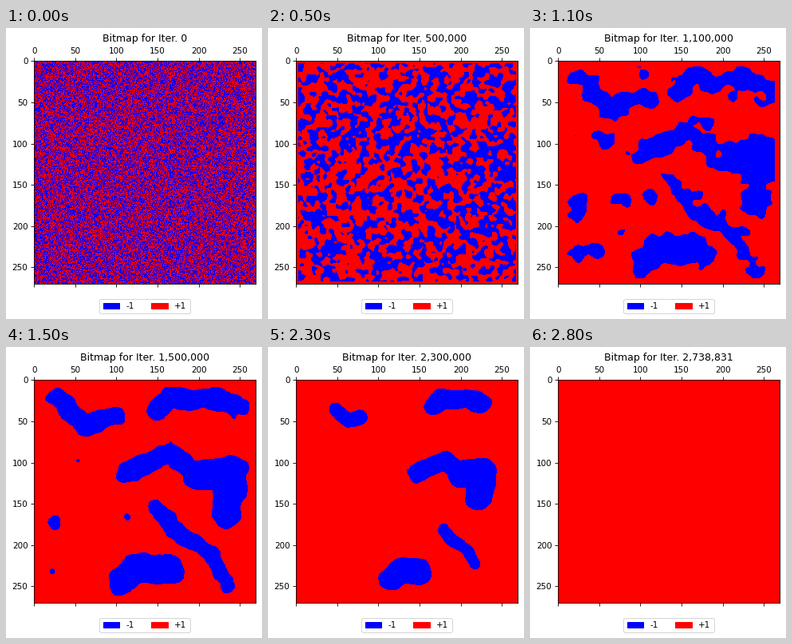
These frames come from a looping animation (321 px wide and 364 px high, 2900 ms). A matplotlib script:

```python
import numpy as np
import matplotlib.pyplot as plt
from matplotlib.animation import FuncAnimation
from matplotlib.colors import ListedColormap
from matplotlib.patches import Patch

W, H, DPI = 321, 364, 75
LEFT, TOP, SIDE = 34.7, 40.95, 278.6
N = 270
FRAMES, STEP, LAST = 29, 100_000, 2_738_831
FORMED, SETTLED = 11, 15
FLOOR, CEIL = -12, 9

# Large domains: frame of death, radius, point they shrink to, spine (stage pixels).
BODIES = [
    (24.5, 13, (101, 89), [(63, 63), (98, 98), (136, 86)]),
    (27.0, 14, (235, 66), [(188, 78), (205, 64), (260, 65), (290, 74)]),
    (27.8, 13, (245, 156), [(150, 159), (205, 132), (240, 160)]),
    (27.8, 19, (245, 156), [(240, 160), (283, 156), (276, 207)]),
    (24.8, 10, (245, 250), [(187, 200), (215, 232), (255, 256), (278, 298)]),
    (27.0, 18, (170, 284), [(145, 293), (165, 275), (205, 279)]),
]
# Small round domains: centre and frame of death.
SPECKS = [(60, 220, 18), (89, 142, 15.4), (152, 213, 15.4), (57, 280, 15.4),
          (111, 217, 14.2), (88, 284, 14), (140, 60, 14.3), (222, 120, 14.5)]

cells = (np.arange(N) + 0.5) * SIDE / N
X, Y = np.meshgrid(LEFT + cells, TOP + cells)
border = np.minimum(cells, SIDE - cells)
border = np.minimum(border[:, None], border[None, :])

rng = np.random.default_rng(7)
spins = rng.choice([-1.0, 1.0], (N, N))
spectrum = np.fft.fft2(spins)
freq = np.fft.fftfreq(N)
freq2 = freq[:, None] ** 2 + freq[None, :] ** 2


def blurred(sigma):
    out = np.fft.ifft2(spectrum * np.exp(-2 * np.pi**2 * sigma**2 * freq2)).real
    return (out - out.mean()) / out.std()


def distance(a, b):
    d = b - a
    u = ((X - a[0]) * d[0] + (Y - a[1]) * d[1]) / (d @ d + 1e-9)
    u = np.clip(u, 0, 1)
    return np.hypot(X - a[0] - u * d[0], Y - a[1] - u * d[1])


def domains(k):
    """Depth inside the domains, which shorten first and thin out last."""
    depth = np.full((N, N), float(FLOOR))
    for death, r, focus, spine in BODIES:
        age = (k - SETTLED) / (death - SETTLED)
        if age < 1:
            pts = focus + (np.array(spine) - focus) * np.sqrt(1 - age)
            r *= np.sqrt(1 - age**4)
            for a, b in zip(pts[:-1], pts[1:]):
                depth = np.maximum(depth, r - distance(a, b))
    for x, y, death in SPECKS:
        if k < death:
            r = 4.5 * np.sqrt(death - k)
            depth = np.maximum(depth, r - np.hypot(X - x, Y - y))
    return np.minimum(depth, CEIL)


def bitmap(k):
    """Random spins that coarsen, settle into domains and vanish."""
    if k == 0:
        return spins
    noise = blurred(min(0.43 * k, 4.5))
    amp = 0.8 + 16 * np.exp((7 - k) / 2.5)
    field = domains(max(k, FORMED)) + amp * noise
    field = np.minimum(field, border - 0.7 * min(k, 13))
    return np.where(field > 0, -1, 1)


fig = plt.figure(figsize=((W + 0.001) / DPI, (H + 0.001) / DPI), dpi=DPI)
ax = fig.add_axes([LEFT / W, 1 - (TOP + SIDE) / H, SIDE / W, SIDE / H])
image = ax.matshow(bitmap(0), cmap=ListedColormap(["blue", "red"]), vmin=-1, vmax=1)
title = ax.set_title("Bitmap for Iter. 0")
ax.legend(
    handles=[Patch(color="blue", label="-1"), Patch(color="red", label="+1")],
    loc="upper center", bbox_to_anchor=(0.5, -0.05), ncol=2,
)


def update(k):
    image.set_data(bitmap(k))
    title.set_text(f"Bitmap for Iter. {min(k * STEP, LAST):,}")
    return image, title


anim = FuncAnimation(fig, update, frames=FRAMES, interval=100, repeat=True,
                     repeat_delay=0, blit=False)
plt.show()
```
